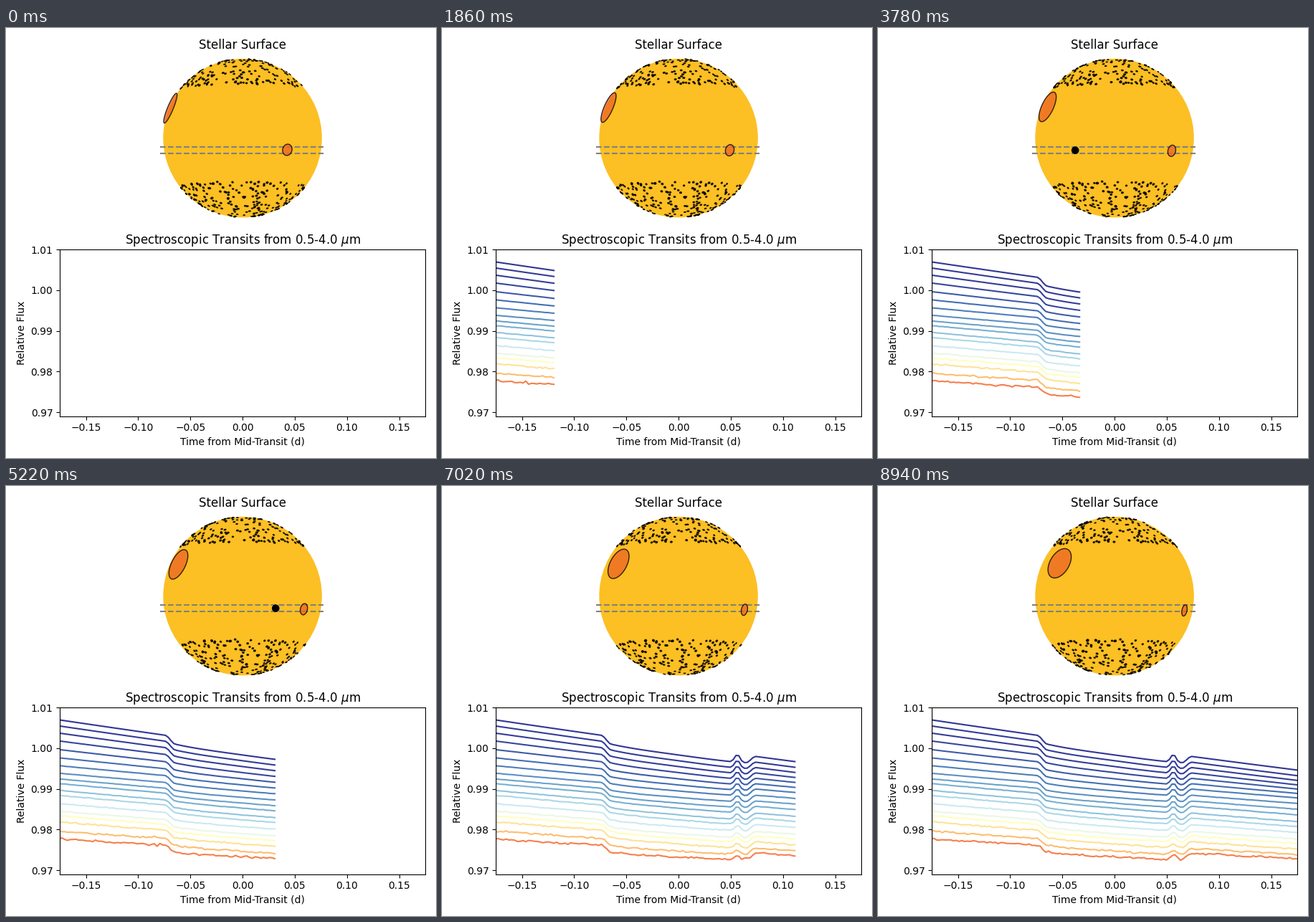
A matplotlib script for the animation above (9 s loop, 600 px wide and 600 px high).

```python
import numpy as np
import matplotlib.pyplot as plt
from matplotlib.animation import FuncAnimation
from matplotlib.collections import PolyCollection
from matplotlib.patches import Circle

FRAMES = 150
R_PX = 111.0
TILT = np.radians(5)
SPIN = np.radians(29.2)
PX_FLUX = 5680.0

time = np.linspace(-0.2, 0.2, FRAMES)

# light curves: starting level and downward drift per channel, in pixels
START = np.array([326.5, 335, 345, 356, 368, 379.5, 390.5, 401, 409,
                  415.5, 425, 432, 443.5, 454, 460.5, 469, 482, 493])
DRIFT = np.array([51.5, 51, 48.5, 45, 40.5, 36.5, 33, 31, 31,
                  32, 32, 32, 29.5, 28.5, 28.5, 28, 24, 20])
SHADE = [0, .01, .015, .03, .06, .09, .12, .15, .18,
         .21, .25, .30, .36, .43, .50, .59, .67, .77]
N = len(START)
rank = np.arange(N) / (N - 1)


def light_curves():
    u = (time + 0.175) / 0.35
    trend = u * (1.47 - 0.11 * u)
    a = np.abs(time)
    edge = np.clip((0.0742 - a) / 0.0095, 0, 1)
    edge = edge * edge * (3 - 2 * edge)
    dip = edge * (1 - 0.28 * (a / 0.0742) ** 4)
    bump = np.exp(-((time - 0.0563) / 0.00384) ** 4)
    drop = (np.outer(DRIFT, trend) + np.outer(12.5 - 1.7 * rank, dip)
            - np.outer(9.3 - 4.3 * rank, bump))
    return 1.01 - (START[:, None] + drop - 309.2) / PX_FLUX


flux = light_curves()
sigma = 0.00002 * rank + 0.00011 * rank ** 3


def project(lat, lon):
    x = np.cos(lat) * np.sin(lon)
    y, z = np.sin(lat), np.cos(lat) * np.cos(lon)
    c, s = np.cos(TILT), np.sin(TILT)
    return x, y * c + z * s, z * c - y * s


def outlines(lat, lon, radius, points):
    """Foreshortened outlines of the round spots on the visible side."""
    x, y, z = project(lat, lon)
    seen = z > 0
    x, y, z, radius = x[seen], y[seen], z[seen], radius[seen]
    r = np.hypot(x, y)
    ux, uy = x / r, y / r
    phi = np.linspace(0, 2 * np.pi, points, endpoint=False)
    along = np.outer(radius, np.cos(phi))
    out = np.outer(radius * z, np.sin(phi))
    px = x[:, None] - uy[:, None] * along + ux[:, None] * out
    py = y[:, None] + ux[:, None] * along + uy[:, None] * out
    return np.stack([px, py], axis=-1)


def scatter_cap(rng, count, sign):
    low = np.sin(np.radians(38))
    height = low + (0.998 - low) * rng.random(count) ** 1.2
    return sign * np.arcsin(height), rng.uniform(-np.pi, np.pi, count)


rng = np.random.default_rng(12)
north, south = scatter_cap(rng, 390, 1), scatter_cap(rng, 390, -1)
dot_lat = np.concatenate([north[0], south[0]])
dot_lon = np.concatenate([north[1], south[1]])
dot_rad = rng.uniform(0.0095, 0.0135, dot_lat.size)

spot_lat = np.radians([21.1, -12.6])
spot_lon = np.radians([-77.1, 35.3])
spot_rad = np.array([0.203, 0.072])

fig, (star, chart) = plt.subplots(2, 1, figsize=(6, 6), dpi=100)

star.set(xlim=(-1.05, 1.05), ylim=(-1.05, 1.05), aspect="equal",
         title="Stellar Surface")
star.axis("off")
star.add_patch(Circle((0, 0), 1, fc="#fcbf24", ec="none", zorder=1))
for y in (-0.115, -0.194):
    star.plot([-1.042, 1.02], [y, y], "--", color="gray", zorder=2)
dots = PolyCollection([], fc="black", ec="black", alpha=0.8, lw=1, zorder=3)
spots = PolyCollection([], fc="#ed6925", ec="black", alpha=0.8, lw=1,
                       zorder=4)
star.add_collection(dots, autolim=False)
star.add_collection(spots, autolim=False)
planet = star.add_patch(Circle((-2, -0.154), 0.048, fc="black", ec="none",
                               zorder=5))

chart.set(xlim=(-0.175, 0.175), ylim=(0.969, 1.01),
          xticks=np.arange(-3, 4) * 0.05,
          yticks=[0.97, 0.98, 0.99, 1.00, 1.01],
          xlabel="Time from Mid-Transit (d)", ylabel="Relative Flux",
          title=r"Spectroscopic Transits from 0.5-4.0 $\mu$m")
cmap = plt.get_cmap("RdYlBu_r")
lines = [chart.plot([], [], color=cmap(s), lw=1.5)[0] for s in SHADE]
fig.tight_layout()


def update(i):
    turn = SPIN * i / (FRAMES - 1)
    dots.set_verts(outlines(dot_lat, dot_lon + turn, dot_rad, 12))
    spots.set_verts(outlines(spot_lat, spot_lon + turn, spot_rad, 60))
    planet.center = ((275 + 4.22 * (i - 63) - 330) / R_PX, -0.154)
    noise = np.random.default_rng(i).normal(size=flux.shape)
    noisy = flux + sigma[:, None] * noise
    for line, row in zip(lines, noisy):
        line.set_data(time[:i], row[:i])
    return [dots, spots, planet, *lines]


anim = FuncAnimation(fig, update, frames=FRAMES, interval=60,
                     repeat=True, repeat_delay=0, blit=False)
plt.show()
```
